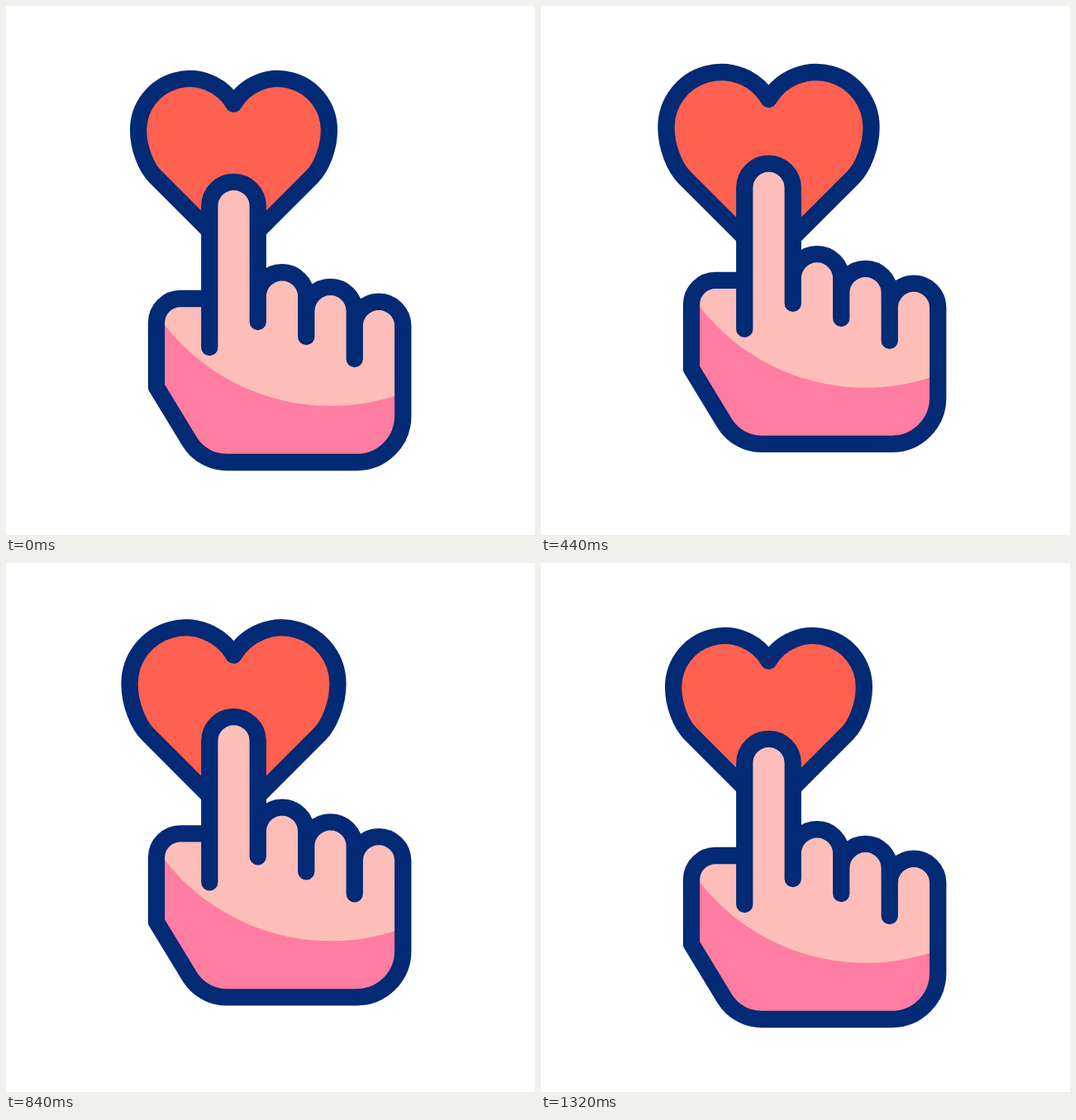
These frames come from a looping animation (640 px wide and 640 px high, 1400 ms). An HTML page:

```html
<!DOCTYPE html>
<html lang="en">
<head>
<meta charset="utf-8">
<title>Finger tapping a heart</title>
<style>
  html, body { margin: 0; width: 100%; height: 100%; overflow: hidden; background: #fff; }
  svg { display: block; width: 100vw; height: 100vh; }
  .line { fill: none; stroke: #022a75; stroke-width: 20.3; stroke-linejoin: round; stroke-linecap: round; }
  #heart { fill: #ff6150; }
</style>
</head>
<body>
<svg viewBox="0 0 640 640">
  <clipPath id="palm"><path class="outline"/></clipPath>
  <path id="heart" class="line"/>
  <g id="hand">
    <path class="outline" fill="#ff7da0"/>
    <circle cx="393" cy="229" r="255" fill="#fdbeb9" clip-path="url(#palm)"/>
    <path class="outline line"/>
  </g>
</svg>
<script>
const LOOP = 1400, STEP = 40;
const heart = document.getElementById('heart');
const hand = document.getElementById('hand');
const outlines = document.querySelectorAll('.outline');

const clamp = u => Math.min(1, Math.max(0, u));
const smooth = u => u * u * (3 - 2 * u);

// cubic-bezier(.55, 0, .45, 1)
function ease(x) {
  let t = x;
  for (let i = 0; i < 6; i++) {
    t -= (((1.3 * t - 1.95) * t + 1.65) * t - x) / ((3.9 * t - 3.9) * t + 1.65);
  }
  return smooth(t);
}

// Rises from 0 to 1 between start and peak, then falls back until end.
const pulse = (t, start, peak, end, curve = smooth) =>
  curve(clamp(t < peak ? (t - start) / (peak - start) : (end - t) / (end - peak)));

// Grows around a fixed centre while the line keeps its weight.
function heartPath(scale) {
  const p = (x, y) => `${275.5 + x * scale} ${194 + y * scale}`;
  const r = 62 * scale;
  return `M${p(0, -75.5)}A${r} ${r} 0 0 0 ${p(-115.4, -44)}` +
    `C${p(-115.4, -22)} ${p(-106, 1.3)} ${p(-95, 12.3)}L${p(0, 107.3)}L${p(95, 12.3)}` +
    `C${p(106, 1.3)} ${p(115.4, -22)} ${p(115.4, -44)}A${r} ${r} 0 0 0 ${p(0, -75.5)}Z`;
}

// Pressing lowers and narrows the tip of the index finger.
function handPath(press) {
  const r = 29.25 - 7.8 * press;
  const tip = 212.8 + 10 * press + r;
  const knuckle = (x, y) => `V${y}A29.25 29.25 0 0 1 ${x} ${y}`;
  return `M246.25 413V382L${275.5 - r} ${tip}A${r} ${r} 0 0 1 ${275.5 + r} ${tip}L304.75 382` +
    knuckle(363.25, 351.5) + 'V400' + knuckle(421.75, 369.2) + 'V427' + knuckle(480.25, 387) +
    'V496A55.8 55.8 0 0 1 424.4 552H267A52.7 52.7 0 0 1 222 526.7' +
    'L182 461V383A29.2 29.2 0 0 1 211.2 354H244';
}

function draw(now) {
  const t = Math.floor(now % LOOP / STEP) * STEP;
  const beat = pulse(t, 347, 533, 725) + pulse(t, 725, 925, 1109);
  const shape = handPath(pulse(t, 460, 620, 810));
  heart.setAttribute('d', heartPath(1 + 0.15 * beat));
  outlines.forEach(path => path.setAttribute('d', shape));
  hand.setAttribute('transform', `translate(0 ${-29.4 * pulse(t, 40, 680, 1320, ease)})`);
}

const begin = performance.now();
function tick() {
  draw(performance.now() - begin);
  requestAnimationFrame(tick);
}
tick();
</script>
</body>
</html>
```
